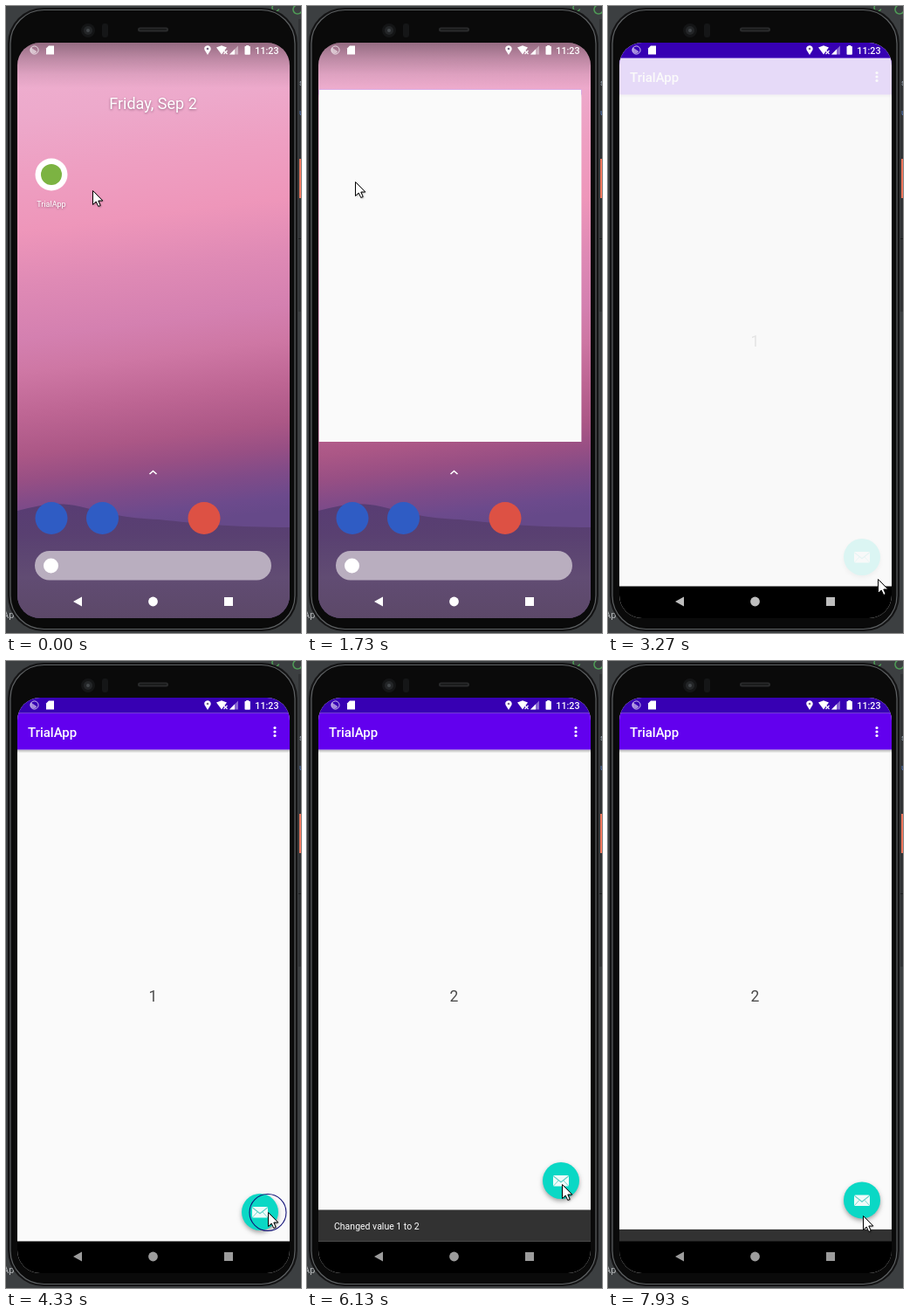
These frames come from a looping animation (338x718 px, 8 s). An HTML page with a canvas:

```html
<!DOCTYPE html>
<html lang="en">
<head>
<meta charset="utf-8">
<title>Phone counter demo</title>
<style>
html, body { margin: 0; width: 100%; height: 100%; overflow: hidden; background: #2b2b2b; }
canvas { display: block; width: 338px; height: 718px; }
</style>
</head>
<body>
<canvas id="stage"></canvas>
<script>
const W = 338, H = 718, LOOP = 8000;
const APP_NAME = 'TrialApp';
const SCREEN = { x: 13, y: 42, w: 312, h: 659, r: 26 };
const NAV_TOP = 664.5, SNACK_H = 36;
const OPEN_AT = 1600, OPEN_MS = 336;

const canvas = document.getElementById('stage');
const ratio = window.devicePixelRatio || 1;
canvas.width = W * ratio;
canvas.height = H * ratio;
const c = canvas.getContext('2d');
c.scale(ratio, ratio);

// Timing helpers
const clamp = v => Math.min(1, Math.max(0, v));
const span = (t, start, length) => clamp((t - start) / length);
const mix = (a, b, p) => a + (b - a) * p;
const smooth = p => p * p * (3 - 2 * p);

// cubic-bezier(.4, 0, .2, 1)
function standardEase(x) {
  let lo = 0, hi = 1;
  for (let i = 0; i < 24; i++) {
    const u = (lo + hi) / 2, v = 1 - u;
    if (1.2 * u * v * v + 0.6 * u * u * v + u * u * u < x) lo = u; else hi = u;
  }
  return lo * lo * (3 - 2 * lo);
}

// Drawing helpers
function rect(x, y, w, h, fill) {
  c.fillStyle = fill;
  c.fillRect(x, y, w, h);
}
function roundPath(x, y, w, h, r) {
  c.beginPath();
  c.roundRect(x, y, w, h, r);
}
function roundRect(x, y, w, h, r, fill) {
  roundPath(x, y, w, h, r);
  c.fillStyle = fill;
  c.fill();
}
function disc(x, y, r, fill) {
  c.beginPath();
  c.arc(x, y, r, 0, Math.PI * 2);
  c.fillStyle = fill;
  c.fill();
}
function poly(points, fill) {
  c.beginPath();
  points.forEach(([x, y]) => c.lineTo(x, y));
  c.closePath();
  c.fillStyle = fill;
  c.fill();
}
function line(points, color, width) {
  c.beginPath();
  points.forEach(([x, y]) => c.lineTo(x, y));
  c.strokeStyle = color;
  c.lineWidth = width;
  c.stroke();
}
function text(str, x, y, size, fill, align = 'left', weight = 400) {
  c.font = `${weight} ${size}px Roboto, sans-serif`;
  c.textAlign = align;
  c.fillStyle = fill;
  c.fillText(str, x, y);
}
function shadow(color, blur, dy) {
  c.shadowColor = color;
  c.shadowBlur = blur * ratio;
  c.shadowOffsetY = dy * ratio;
}
function gradient(x0, y0, x1, y1, stops) {
  const g = c.createLinearGradient(x0, y0, x1, y1);
  stops.forEach(([at, color]) => g.addColorStop(at, color));
  return g;
}

function drawDesktop() {
  rect(0, 0, W, H, '#3c3f41');
  rect(335, 15, 3, 335, '#313335');
  rect(335, 266, 3, 1, '#1c1d1e');
  rect(336, 175, 2, 45, '#f0775c');
  c.strokeStyle = '#4f9e57';
  c.lineWidth = 1.5;
  [[309, 2, 4], [334, 4, 5]].forEach(([x, y, r]) => {
    c.beginPath();
    c.arc(x, y, r, 0.4, 5);
    c.stroke();
  });
  text('s', 336, 91, 9, '#a9b7c6');
  text('u', 336, 125, 9, '#5a87d6');
  text('Ap', -4, 701, 11, '#b5b8ba');
}

function drawPhone() {
  roundRect(2, 2, 332, 714, 41, '#141415');
  roundPath(5, 4.5, 326, 709, 38.5);
  c.fillStyle = '#0a0a0a';
  c.fill();
  c.strokeStyle = '#5d6062';
  c.lineWidth = 1.2;
  c.stroke();
  disc(94, 28, 8, '#141516');
  disc(94, 28, 5, '#242628');
  disc(94, 28, 2, '#44484b');
  roundRect(110, 20, 7, 16, 3, '#151617');
  roundRect(151, 24.5, 35, 5, 2.5, '#2a2b2c');
  roundRect(153, 26, 31, 1.5, 1, '#171818');
}

function drawWallpaper() {
  rect(13, 42, 312, 659, gradient(134, 42, 204, 592, [
    [0, '#eeb0d0'], [0.13, '#eda9cb'], [0.24, '#ee9fc2'], [0.36, '#ee96ba'],
    [0.47, '#df8ab5'], [0.58, '#d480b0'], [0.65, '#ce77a4'], [0.74, '#bd6593'],
    [0.82, '#ab5786'], [0.87, '#984f84'], [0.92, '#804b88'], [0.97, '#6c4a8c'], [1, '#664989']
  ]));
  rect(13, 42, 312, 52, gradient(0, 42, 0, 94, [
    [0, 'rgba(35,20,30,.44)'], [0.35, 'rgba(35,20,30,.24)'],
    [0.7, 'rgba(35,20,30,.08)'], [1, 'rgba(35,20,30,0)']
  ]));
  c.beginPath();
  c.moveTo(13, 578);
  c.bezierCurveTo(38, 572, 58, 567, 84, 573);
  c.bezierCurveTo(112, 580, 138, 587, 175, 588);
  c.bezierCurveTo(222, 593, 264, 597, 325, 597);
  c.lineTo(325, 701);
  c.lineTo(13, 701);
  c.closePath();
  c.fillStyle = gradient(0, 568, 0, 701, [
    [0, '#583c73'], [0.28, '#594071'], [0.65, '#614c73'], [1, '#5c4868']
  ]);
  c.fill();
}

function drawHome() {
  drawWallpaper();
  c.save();
  shadow('rgba(60,20,50,.5)', 3, 1);
  text('Friday, Sep 2', 168.5, 118, 18, '#fff', 'center');
  text(APP_NAME, 52, 230, 9, '#fff', 'center');
  c.restore();
  disc(52, 193, 18.5, '#fff');
  disc(52, 193, 12, '#7cb342');
  line([[164.5, 536], [168.5, 532.5], [172.5, 536]], '#fff', 1.6);
  disc(52, 586.5, 18.5, '#2f5cc4');
  disc(110.5, 586.5, 18.5, '#2f5cc4');
  disc(227, 586.5, 18.5, '#dd5144');
  roundRect(33, 624, 271, 33.5, 16.7, '#b9aebf');
  disc(51.5, 641, 8.5, '#fff');
}

function drawFab(y) {
  c.save();
  shadow('rgba(0,0,0,.35)', 5, 2.5);
  disc(291, y, 21, '#0ad8c5');
  c.restore();
  roundRect(282, y - 6, 18, 12.5, 1.5, '#f0fbfa');
  const crease = '#59cfc5';
  line([[282.5, y - 5], [291, y + 1.8], [299.5, y - 5]], crease, 1.1);
  line([[282.5, y + 6], [288, y]], crease, 0.8);
  line([[299.5, y + 6], [294, y]], crease, 0.8);
}

function drawApp(t) {
  const rise = standardEase(span(t, 4800, 250)) - standardEase(span(t, 7830, 250));
  const lift = rise * SNACK_H;
  rect(13, 42, 312, 659, '#fafafa');
  rect(13, 101.5, 312, 4, gradient(0, 101.5, 0, 105.5, [
    [0, 'rgba(0,0,0,.28)'], [1, 'rgba(0,0,0,0)']
  ]));
  rect(13, 59.5, 312, 42, '#6200ee');
  text(APP_NAME, 25, 87, 15, '#fff', 'left', 500);
  [76.5, 81, 85.5].forEach(y => disc(308, y, 1.6, '#fff'));
  text(t < 4800 ? '1' : '2', 168.5, 390, 17.5, '#4c4c4c', 'center');
  drawFab(631 - lift);

  // Blank starting window dissolves into the content
  const veil = 1 - span(t, 3230, 330);
  rect(13, 59.5, 312, 605, `rgba(250,250,250,${veil})`);
  rect(13, 42, 312, 17.5, '#3700b3');

  if (lift > 0) {
    const top = NAV_TOP - lift;
    rect(13, top, 312, SNACK_H, '#323232');
    c.save();
    c.globalAlpha = span(t, 4870, 180) * (1 - span(t, 7830, 180));
    text('Changed value 1 to 2', 31, top + 22, 10.5, '#fff');
    c.restore();
  }
  rect(13, NAV_TOP, 312, 37, '#000');
}

function drawStatus() {
  const white = '#fff';
  c.strokeStyle = 'rgba(255,255,255,.75)';
  c.lineWidth = 1;
  c.beginPath();
  c.arc(32.5, 50.5, 4.6, 0, Math.PI * 2);
  c.stroke();
  c.beginPath();
  c.arc(32, 50, 4.2, 0.6, 3.8);
  c.fillStyle = 'rgba(255,255,255,.55)';
  c.fill();
  poly([[49, 45.5], [55, 45.5], [55, 55.5], [46, 55.5], [46, 48.5]], white);
  // Location pin
  c.beginPath();
  c.arc(231, 49, 3.7, Math.PI * 0.9, Math.PI * 2.1);
  c.lineTo(231, 56);
  c.closePath();
  c.fillStyle = white;
  c.fill();
  disc(231, 49, 1.3, '#7a6a86');
  // Wi-Fi without connection
  poly([[247, 55.5], [241, 47.5], [247, 45.2], [253, 47.5]], white);
  line([[249.5, 51], [253.5, 55]], white, 1.2);
  line([[253.5, 51], [249.5, 55]], white, 1.2);
  poly([[256, 55.5], [266, 55.5], [266, 45.5]], 'rgba(255,255,255,.4)');
  poly([[256, 55.5], [262, 55.5], [262, 49.5]], white);
  rect(275.2, 45, 3, 2, white);
  roundRect(273.5, 46, 6.4, 9.7, 0.8, white);
  text('11:23', 312.5, 54.5, 10.7, white, 'right', 500);
}

function drawNav(t) {
  const level = t < 1860 ? 255 : Math.round(mix(192, 156, span(t, 3250, 350)));
  const fill = `rgb(${level},${level},${level})`;
  poly([[77, 682], [87, 676.5], [87, 687.5]], fill);
  disc(168.5, 682, 5.4, fill);
  rect(250, 677, 10, 10, fill);
}

// Window grows out of the launcher icon, faster sideways than vertically
function clipWindow(t) {
  const p = span(t, OPEN_AT, OPEN_MS);
  const px = 1 - Math.pow(1 - p, 6.4), py = standardEase(p);
  const left = mix(33, 13, px), right = mix(71, 325, px);
  const top = mix(174, 42, py), bottom = mix(205, 701, py);
  c.beginPath();
  c.rect(left, top, right - left, bottom - top);
  c.clip();
}

function drawScreen(t) {
  c.save();
  roundPath(SCREEN.x, SCREEN.y, SCREEN.w, SCREEN.h, SCREEN.r);
  c.clip();
  if (t < OPEN_AT + OPEN_MS) drawHome();
  if (t > OPEN_AT) {
    c.save();
    clipWindow(t);
    drawApp(t);
    c.restore();
  }
  drawStatus();
  drawNav(t);
  c.restore();
}

// Pointer stops: time, x, y
const STOPS = [
  [70, 99, 211], [560, 55, 201], [2450, 55, 201], [3270, 309, 656],
  [3750, 309, 656], [4200, 300, 631], [4850, 300, 631], [5550, 292, 599],
  [6650, 292, 599], [7330, 292, 613], [7470, 292, 613], [7900, 292, 635]
];
const CLICKS = [[1340, 1540], [4260, 4540]];

function pointerAt(t) {
  const next = STOPS.findIndex(s => s[0] > t);
  if (next === 0) return STOPS[0].slice(1);
  if (next < 0) return STOPS[STOPS.length - 1].slice(1);
  const a = STOPS[next - 1], b = STOPS[next];
  const p = smooth(span(t, a[0], b[0] - a[0]));
  return [mix(a[1], b[1], p), mix(a[2], b[2], p)];
}

function drawPointer(t) {
  const [x, y] = pointerAt(t).map(Math.round);
  if (CLICKS.some(([from, to]) => t >= from && t < to)) {
    c.beginPath();
    c.arc(x, y + 0.5, 21, 0, Math.PI * 2);
    c.strokeStyle = '#101078';
    c.lineWidth = 1.1;
    c.stroke();
  }
  const arrow = [[0.5, 0.5], [0.5, 16.5], [4.2, 13], [6.8, 18.5], [9.2, 17.4], [6.8, 12], [11.8, 12]];
  c.save();
  c.translate(x, y);
  c.save();
  shadow('rgba(0,0,0,.4)', 2, 1);
  c.shadowOffsetX = ratio;
  poly(arrow, '#fff');
  c.restore();
  line([...arrow, arrow[0]], '#000', 1);
  c.restore();
}

function frame(now) {
  const t = now % LOOP;
  drawDesktop();
  drawPhone();
  drawScreen(t);
  drawPointer(t);
  requestAnimationFrame(frame);
}
requestAnimationFrame(frame);
</script>
</body>
</html>
```
